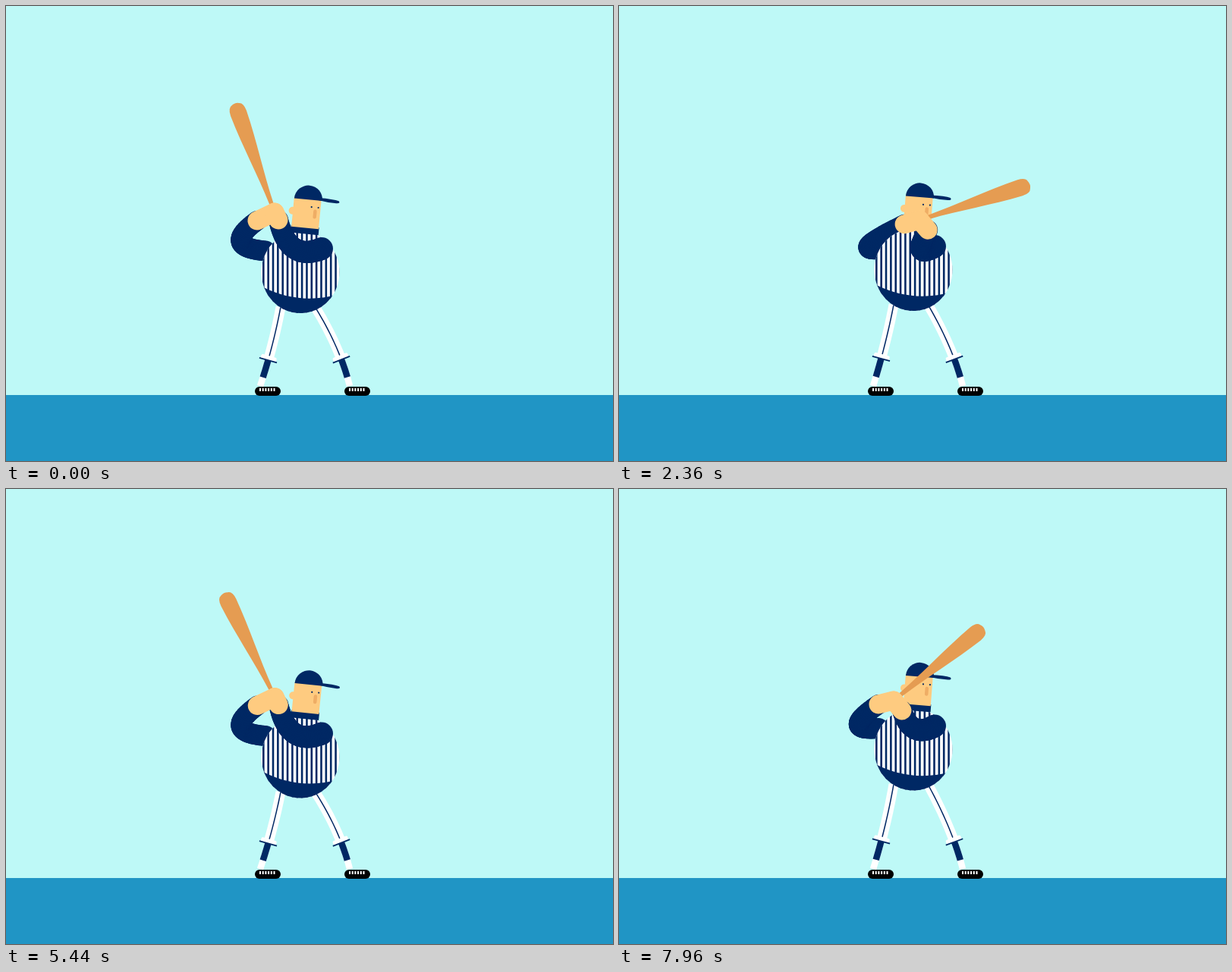
An HTML page with a canvas that plays this animation: 800 by 600 pixels, repeating every 8 s.

```html
<!DOCTYPE html>
<html lang="en">
<head>
<meta charset="utf-8">
<title>Batter</title>
<style>
html, body { margin: 0; width: 100%; height: 100%; overflow: hidden; background: #bef9f7; }
canvas { display: block; width: 800px; height: 600px; }
</style>
</head>
<body>
<canvas id="stage" width="800" height="600"></canvas>
<script>
const ctx = document.getElementById('stage').getContext('2d');
const SKY = '#bef9f7', GROUND = '#2095c5', NAVY = '#002864', SKIN = '#fecb80',
  WOOD = '#e59c52', NOSE = '#efad65', GREEN = '#20b842', WHITE = '#fff', BLACK = '#000';
const LOOP = 8000, PLAY = 5360;
const TAU = Math.PI * 2, rad = deg => deg * Math.PI / 180;

// c: body centre, g: grip, w1/w2: wrists from the grip, s1/s2: shoulders,
// a/b: elbows (back, front), h1/h2: hips, k: left knee, r: right ankle, toe: left shoe angle
const ready = {
  cx: 388, cy: 351, tilt: 5.5, belly: 7, h1: -26, h2: 17, kx: 352, ky: 450, rx: 453, ry: 501, toe: 0,
  gx: 354, gy: 272, bat: -110, w1x: -23, w1y: 11, w2x: 5, w2y: 10,
  s1: -46, ax: 283, ay: 318, s2: 28, bx: 372, by: 338, arm: 30, smear: 0
};
const swing = {
  cx: 385, cy: 347, tilt: -9, belly: -30, h1: -2, h2: 15, kx: 399, ky: 465, rx: 412, ry: 487, toe: 9,
  gx: 393, gy: 374, bat: -317, w1x: -15, w1y: -13, w2x: -15, w2y: -13,
  s1: -4, ax: 380, ay: 335, s2: -10, bx: 376, by: 335, arm: 48, smear: 1
};
const follow = {
  cx: 384, cy: 399, tilt: 11, belly: 19, h1: -9, h2: 34, kx: 386, ky: 486, rx: 507, ry: 501, toe: 4,
  gx: 470, gy: 311, bat: -507, w1x: -3, w1y: 20, w2x: 2, w2y: 20,
  s1: 46, ax: 460, ay: 377, s2: 24, bx: 455, by: 374, arm: 37, smear: 0
};
const recover = {
  cx: 365, cy: 363, tilt: 16, belly: 24, h1: -18, h2: 24, kx: 358, ky: 451, rx: 487, ry: 500, toe: -14,
  gx: 483, gy: 284, bat: -480, w1x: -20, w1y: 12, w2x: -8, w2y: 21,
  s1: 48, ax: 435, ay: 343, s2: 23, bx: 424, by: 331, arm: 40, smear: 0
};
const home = { ...ready, bat: -470 };
const rebound = {
  ...home, cy: 343.5, tilt: 4.5, ky: 446, gx: 362, gy: 279, bat: -399,
  w1x: -20, w1y: 5, w2x: 11, w2y: 13, ax: 290, ay: 320, bx: 385, by: 330
};

function shift(pose, dy, changes) {
  const p = { ...pose };
  for (const k of ['cy', 'gy', 'ay', 'by']) p[k] += dy;
  return Object.assign(p, changes);
}

const keys = [
  [0, ready],
  [360, shift(ready, 20, { gx: 356, bat: -164, tilt: 8, belly: 12 })],
  [580, shift(ready, 20, { gx: 356, bat: -174, tilt: 7, belly: 12, rx: 440, ry: 486 })],
  [680, shift(ready, 12, {
    gx: 352, gy: 335, bat: -236, tilt: -4, belly: -18, rx: 425, ry: 486,
    s1: -20, ax: 335, ay: 345, s2: 4, bx: 362, by: 345, arm: 40, smear: 0.6
  })],
  [760, swing],
  [840, {
    ...follow, cx: 388, cy: 366, tilt: -2, belly: -10, rx: 480, ry: 496, gx: 455, gy: 350, bat: -390,
    w1x: -18, w1y: 2, w2x: -16, w2y: 6, ax: 425, ay: 360, bx: 420, by: 360, smear: 0.6
  }],
  [920, { ...follow, cy: 386, gx: 472, gy: 314, bat: -478, smear: 0.1 }],
  [1040, shift(follow, 3, { gx: 450, bat: -535 })],
  [1400, shift(follow, 2, { gx: 458, bat: -522 })],
  [1720, follow],
  [1880, recover],
  [2040, { ...recover, cy: 355, cx: 370, tilt: 11, gx: 458, gy: 274, bat: -450, rx: 472, ry: 492 }],
  [2240, { ...rebound, gx: 414, gy: 274, bat: -398, s1: -15, ax: 345, ay: 325, w1x: -20, w1y: 8 }],
  [2420, shift(rebound, 6, { gx: 388, bat: -374 })],
  [2600, rebound],
  [2760, shift(home, -4, { bat: -450 })],
  [2880, shift(home, 2, { bat: -488 })],
  [3040, home],
  [3900, home],
  [3960, shift(home, 16, { tilt: -3 })],
  [4100, shift(home, -5, { tilt: 3 })],
  [4220, shift(home, 0, { tilt: 1.5 })],
  [4680, shift(home, 0, { tilt: 1.5 })],
  [4800, home],
  [4860, shift(home, 5)],
  [5000, home],
  [PLAY, home]
];

// Smooth curve through the keys that never overshoots them.
function poseAt(t) {
  let i = 0;
  while (i < keys.length - 2 && keys[i + 1][0] <= t) i++;
  const [t0, p0] = keys[i], [t1, p1] = keys[i + 1];
  const span = t1 - t0, u = (t - t0) / span, pose = {};
  const slope = (j, name) => keys[j] && keys[j + 1]
    ? (keys[j + 1][1][name] - keys[j][1][name]) / (keys[j + 1][0] - keys[j][0]) : 0;
  const blend = (a, b) => a * b > 0 ? 2 * a * b / (a + b) : 0;
  for (const n in p0) {
    const d = slope(i, n), m0 = blend(slope(i - 1, n), d), m1 = blend(d, slope(i + 1, n));
    const e = u * u * (3 - 2 * u);
    pose[n] = p0[n] + (p1[n] - p0[n]) * e
      + span * u * (1 - u) * (m0 * (1 - u) - m1 * u);
  }
  return pose;
}

const quad = (a, b, c, t) => [0, 1].map(i =>
  (1 - t) ** 2 * a[i] + 2 * t * (1 - t) * b[i] + t * t * c[i]);

function ellipse(x, y, rx, ry, color) {
  ctx.fillStyle = color;
  ctx.beginPath();
  ctx.ellipse(x, y, rx, ry, 0, 0, TAU);
  ctx.fill();
}

function line(points, width, color, cap = 'butt') {
  ctx.strokeStyle = color;
  ctx.lineWidth = width;
  ctx.lineCap = cap;
  ctx.lineJoin = 'round';
  ctx.beginPath();
  points.forEach(p => ctx.lineTo(...p));
  ctx.stroke();
}

function placed(x, y, angle, draw) {
  ctx.save();
  ctx.translate(x, y);
  ctx.rotate(rad(angle));
  draw();
  ctx.restore();
}

function roundBox(x, y, w, h, r, color) {
  ctx.fillStyle = color;
  ctx.beginPath();
  ctx.roundRect(x, y, w, h, r);
  ctx.fill();
}

function drawLeg(hip, knee, ankle, toe) {
  const part = (from, to) => Array.from({ length: 13 }, (_, i) =>
    quad(hip, knee, ankle, from + (to - from) * i / 12));
  line(part(0.6, 1), 8.5, WHITE);
  line(part(0.66, 0.89), 8.5, NAVY);
  line(part(0, 0.65), 13, WHITE);
  line(part(0, 0.62), 1.5, NAVY);
  const a = quad(hip, knee, ankle, 0.63), b = quad(hip, knee, ankle, 0.67);
  placed(b[0], b[1], Math.atan2(b[1] - a[1], b[0] - a[0]) * 180 / Math.PI, () => {
    roundBox(-6, -10.5, 6, 21, 2, WHITE);
    line([[0, -12], [0, 12]], 1.8, NAVY);
  });
  placed(ankle[0] + 10, ankle[1] + 7, toe, () => {
    roundBox(-17, -6, 34, 12, 6, BLACK);
    for (let i = 0; i < 6; i++) roundBox(-11 + i * 3.7, -4, 2, 4, 0, WHITE);
  });
}

function drawArm(shoulder, elbow, wrist, width) {
  for (let i = 0; i <= 40; i++) {
    const t = i / 40, r = (width + (26 - width) * t) / 2;
    ellipse(...quad(shoulder, elbow, wrist, t), r, r, NAVY);
  }
}

function drawTorso(p) {
  ctx.save();
  ctx.translate(p.cx, p.cy);
  ctx.beginPath();
  ctx.ellipse(0, 0, 51.5, 54, 0, 0, TAU);
  ctx.clip();
  ctx.fillStyle = WHITE;
  ctx.fillRect(-60, -60, 120, 120);
  ctx.fillStyle = NAVY;
  for (let x = -50; x < 56; x += 6.35) ctx.fillRect(x, -60, 2.6, 120);
  ctx.rotate(rad(p.belly));
  ctx.beginPath();
  ctx.moveTo(-60, 20);
  ctx.quadraticCurveTo(0, 48, 60, 20);
  ctx.lineTo(60, 70);
  ctx.lineTo(-60, 70);
  ctx.fill();
  ctx.restore();
}

function onHead(p, draw) {
  const lean = rad(p.tilt * 1.25);
  placed(p.cx - 1 + 58 * Math.sin(lean), p.cy - 58 * Math.cos(lean), p.tilt, draw);
}

function drawHead(p) {
  onHead(p, () => {
    roundBox(-18.5, -3, 37, 10, 0, NAVY);
    ellipse(-18.5, -22, 5, 5, SKIN);
    roundBox(-18, -55, 36, 54, [18, 18, 0, 0], SKIN);
    ellipse(6, -29, 1.1, 1.1, NAVY);
    ellipse(15, -29, 1.1, 1.1, NAVY);
    roundBox(9, -26, 4.5, 12, 2.2, NOSE);
  });
}

function drawCap(p, dy) {
  ctx.save();
  ctx.translate(0, dy);
  onHead(p, () => {
    ctx.fillStyle = NAVY;
    ctx.beginPath();
    ctx.arc(0.8, -38.5, 18.6, Math.PI, 0);
    ctx.fill();
    placed(18, -40, p.tilt - 5, () => {
      ctx.beginPath();
      ctx.moveTo(-4, -2);
      ctx.quadraticCurveTo(16, -2.5, 23, -0.5);
      ctx.quadraticCurveTo(26, 2.5, 20, 2.8);
      ctx.quadraticCurveTo(8, 3, -4, 1);
      ctx.fill();
    });
  });
  ctx.restore();
}

function drawBat(p) {
  const s = p.smear, lead = 0.5 * s - 1;
  placed(p.gx, p.gy, p.bat, () => {
    ctx.fillStyle = WOOD;
    ctx.beginPath();
    ctx.moveTo(-15, -4);
    ctx.lineTo(12, -2.7);
    ctx.bezierCurveTo(55, 4 * lead, 95, 10 * lead, 139, 11 * lead);
    ctx.quadraticCurveTo(150, 11 * lead, 151.5, 5 * lead);
    ctx.quadraticCurveTo(154, 0, 151.5, 5);
    ctx.quadraticCurveTo(150, 11, 139, 11);
    ctx.bezierCurveTo(95, 10, 55, 4, 12, 2.7);
    ctx.lineTo(-15, 4);
    ctx.quadraticCurveTo(-19, 0, -15, -4);
    ctx.fill();
    if (s < 0.02) return;
    ctx.beginPath();
    ctx.moveTo(22, 0);
    ctx.bezierCurveTo(34, 25 * s, 16, 78 * s, 43, 92 * s);
    ctx.bezierCurveTo(75, 106 * s, 110, 62 * s, 148, 12);
    ctx.lineTo(140, -3);
    ctx.fill();
  });
}

function drawBall(t) {
  const between = (from, to) => t >= from && t < to && (t - from) / (to - from);
  let u, at, stretch = 3.5;
  if ((u = between(715, 845)) !== false) at = [816 - 392 * u, 277];
  else if ((u = between(845, 1010)) !== false) at = [470 + 360 * u, 277 - 100 * u];
  else if ((u = between(3720, 3910)) !== false) { at = [394, 238 * u * u - 14]; stretch = 0; }
  else if ((u = between(3910, 4210)) !== false) { at = [390 - 410 * u, 224 - 520 * u + 420 * u * u]; stretch = 2; }
  else if ((u = between(5080, 5330)) !== false) at = [820 - 840 * u, 277];
  if (at) roundBox(at[0] - 11.5 - stretch, at[1] - 11.5, 23 + 2 * stretch, 23, 11, GREEN);
}

function draw(t) {
  const p = poseAt(t);
  ctx.fillStyle = SKY;
  ctx.fillRect(0, 0, 800, 600);
  ctx.fillStyle = GROUND;
  ctx.fillRect(0, 513, 800, 87);
  drawBall(t);

  const hipY = p.cy + 46, grip = [p.gx, p.gy];
  const backWrist = [p.gx + p.w1x, p.gy + p.w1y], frontWrist = [p.gx + p.w2x, p.gy + p.w2y];
  drawLeg([p.cx + p.h1, hipY], [p.kx, p.ky], [335, 501], p.toe);
  drawLeg([p.cx + p.h2, hipY - 4], [440, 449], [p.rx, p.ry], (p.ry - 501) * 1.2);
  drawArm([p.cx + p.s1, p.cy - 28], [p.ax, p.ay], backWrist, 27);
  drawTorso(p);
  drawHead(p);

  const flight = (t - 3920) / 880, airborne = flight > 0 && flight < 1;
  drawCap(airborne ? ready : p, airborne ? -560 * flight * (1 - flight) : 0);

  drawArm([p.cx + p.s2, p.cy - 31], [p.bx, p.by], frontWrist, p.arm);
  drawBat(p);
  line([backWrist, grip], 25, SKIN, 'round');
  line([frontWrist, grip], 25, SKIN, 'round');
}

function tick() {
  draw(performance.now() % LOOP % PLAY);
  requestAnimationFrame(tick);
}
tick();
</script>
</body>
</html>
```
